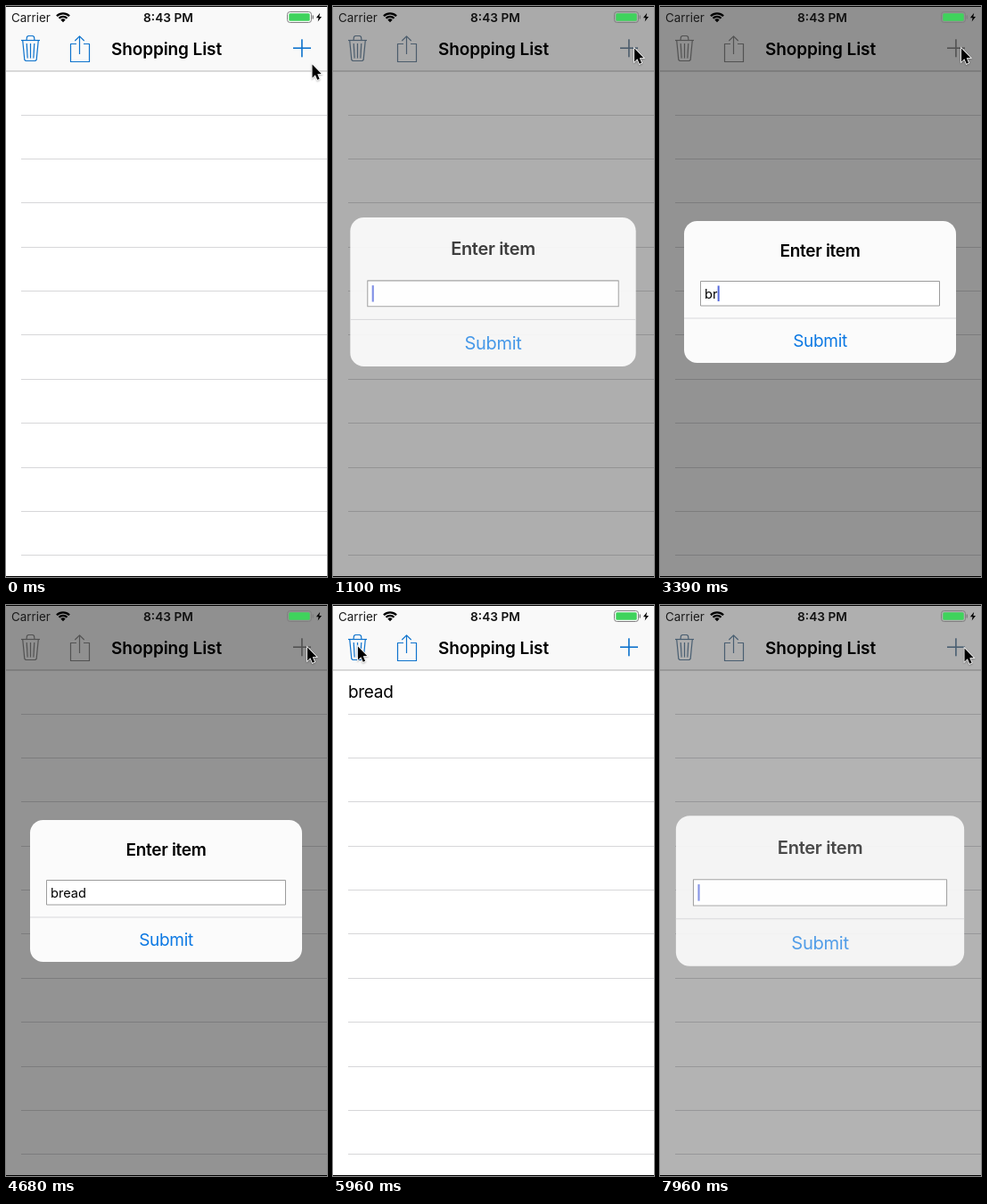
Animation of 360x640 px, one loop 7990 ms. Source, as an HTML page with a canvas:

```html
<!DOCTYPE html>
<html lang="en">
<head>
<meta charset="utf-8">
<title>Shopping List</title>
<style>
  html, body { margin: 0; width: 100%; height: 100%; overflow: hidden; background: #fff; }
  canvas { display: block; width: 100vw; height: 100vh; }
</style>
</head>
<body>
<canvas id="stage"></canvas>
<script>
const W = 360, H = 640, LOOP = 7990;
const FONT = 'Inter, Roboto, sans-serif';
const ROW = 49.4, FIRST_LINE = 122;
const ITEM = 'bread';
const KEY_TIMES = [3080, 3340, 3510, 3670, 3840];
const OPEN = [970, 7842];
const CLOSE = 4715, CLOSE_MS = 400;
const INSERT = 5205, INSERT_MS = 300, CLEAR = 6200;
// Pointer stops: time, x, y
const POINTER = [
  [0, 343.5, 65.5], [150, 343.5, 65.5], [700, 338, 47.5], [5140, 338, 47.5],
  [5900, 28, 46.5], [6450, 28, 46.5], [7150, 341.5, 48.5], [LOOP, 341.5, 48.5]
];

const canvas = document.getElementById('stage');
const ctx = canvas.getContext('2d');
const dpr = window.devicePixelRatio || 1;
canvas.width = W * dpr;
canvas.height = H * dpr;

const clamp = v => Math.max(0, Math.min(1, v));
const lerp = (a, b, p) => a + (b - a) * p;
const smooth = p => p * p * (3 - 2 * p);
const easeInOut = p => p < 0.5 ? 2 * p * p : 1 - 2 * (1 - p) * (1 - p);
const mix = (a, b, p) => `rgb(${a.map((v, i) => Math.round(lerp(v, b[i], p))).join(',')})`;

function spring(ms) {
  if (ms <= 0) return 0;
  const x = ms * 0.0205;
  return 1 - (1 + x) * Math.exp(-x);
}

function text(str, x, y, size, { weight = 400, color = '#000', align = 'left', spacing = 0 } = {}) {
  ctx.font = `${weight} ${size}px ${FONT}`;
  ctx.letterSpacing = spacing + 'px';
  ctx.textAlign = align;
  ctx.fillStyle = color;
  ctx.fillText(str, x, y);
}

function rect(x, y, w, h, color) {
  ctx.fillStyle = color;
  ctx.fillRect(x, y, w, h);
}

function polyline(...points) {
  ctx.beginPath();
  points.forEach(([x, y], i) => i ? ctx.lineTo(x, y) : ctx.moveTo(x, y));
}

function strokeLine(...points) {
  polyline(...points);
  ctx.stroke();
}

function withAlpha(alpha, draw) {
  ctx.save();
  ctx.globalAlpha *= alpha;
  draw();
  ctx.restore();
}

function drawRows(t) {
  const p = easeInOut(clamp((t - INSERT) / INSERT_MS));
  const inserted = t >= INSERT && t < CLEAR;
  const shift = inserted ? p * ROW : 0;
  const line = y => rect(17, Math.floor(y), W - 17, 1, '#d7d7d9');
  for (let y = FIRST_LINE + shift; y < H - 1; y += ROW) line(y);
  if (inserted) withAlpha(p, () => {
    line(FIRST_LINE);
    text(ITEM, 17, 104, 19, { spacing: -0.3 });
  });
}

function drawNav(dim) {
  rect(0, 0, W, 73, '#f9f9f9');
  rect(0, 72.5, W, 1, '#b5b5b5');
  text('Shopping List', 180, 55, 19, { weight: 600, align: 'center', spacing: -0.1 });

  const tint = mix([14, 115, 205], [142, 142, 142], dim);
  ctx.strokeStyle = tint;
  ctx.lineWidth = 1.2;
  ctx.lineJoin = 'round';

  // trash
  strokeLine([17, 38.5], [38, 38.5]);
  strokeLine([23, 38.5], [23.5, 34.5], [25, 33.5], [30, 33.5], [31.5, 34.5], [32, 38.5]);
  strokeLine([18.7, 38.5], [20.8, 60.3], [22.2, 61.5], [32.8, 61.5], [34.2, 60.3], [36.3, 38.5]);
  for (const d of [-1, 0, 1]) strokeLine([27.5 + d * 4.3, 42], [27.5 + d * 3.3, 58.5]);

  // share
  strokeLine([79, 42.5], [72.5, 42.5], [72.5, 62.5], [93.5, 62.5], [93.5, 42.5], [87, 42.5]);
  strokeLine([82.5, 34], [82.5, 54]);
  strokeLine([77.3, 39], [82.5, 33.8], [87.7, 39]);

  // add
  rect(322, 46.4, 20, 1.6, tint);
  rect(331.1, 37.3, 1.6, 20, tint);
}

function drawStatus() {
  text('Carrier', 6, 17.5, 13.4, { color: '#1a1a1a' });
  text('8:43 PM', 182, 17.5, 13.7, { weight: 600, color: '#111', align: 'center' });

  // wi-fi
  const a = Math.PI * 1.25, b = Math.PI * 1.75;
  ctx.strokeStyle = ctx.fillStyle = '#000';
  ctx.lineWidth = 2.3;
  for (const r of [10, 6.4]) {
    ctx.beginPath();
    ctx.arc(64, 18.3, r, a, b);
    ctx.stroke();
  }
  ctx.beginPath();
  ctx.moveTo(64, 18.3);
  ctx.arc(64, 18.3, 3.8, a, b);
  ctx.fill();

  // battery
  ctx.strokeStyle = '#808080';
  ctx.lineWidth = 1;
  ctx.beginPath();
  ctx.roundRect(315.5, 6.5, 27, 12, 3);
  ctx.stroke();
  rect(343.6, 10.5, 1.4, 4, '#808080');
  ctx.fillStyle = '#3fd35c';
  ctx.beginPath();
  ctx.roundRect(317.3, 8.3, 23.4, 8.4, 1.5);
  ctx.fill();
  ctx.fillStyle = '#000';
  polyline([352.2, 7.8], [347.9, 13.2], [350.6, 13.2], [349.7, 17.6], [354, 12], [351.3, 12]);
  ctx.fill();
}

// Visible strength of the dialog, its scale and the time it was opened
function dialogState(t) {
  const start = t >= OPEN[1] ? OPEN[1] : OPEN[0];
  const p = spring(t - start);
  const closing = t >= CLOSE && t < OPEN[1];
  return {
    start,
    scale: closing ? 1 : 1.2 - 0.2 * p,
    show: closing ? 1 - easeInOut(clamp((t - CLOSE) / CLOSE_MS)) : p
  };
}

function caretAlpha(ms) {
  const phase = ms % 1000;
  if (phase < 500) return 1;
  if (phase < 600) return (600 - phase) / 100;
  return phase < 900 ? 0 : (phase - 900) / 100;
}

function drawDialog(t, { start, scale, show }) {
  const typed = start === OPEN[0] ? KEY_TIMES.filter(k => t >= k).length : 0;
  const lastKey = typed ? KEY_TIMES[typed - 1] : start;
  const cx = 179.5, cy = 320.5;

  ctx.save();
  ctx.translate(cx, cy);
  ctx.scale(scale, scale);
  ctx.translate(-cx, -cy);

  withAlpha(1 - (1 - show) ** 2, () => {
    ctx.fillStyle = '#fbfbfb';
    ctx.beginPath();
    ctx.roundRect(27, 241, 305, 159, 14.6);
    ctx.fill();
    rect(27, 349.5, 305, 1, '#d9d9db');
    rect(45, 308, 269, 28.5, '#fff');
    ctx.strokeStyle = '#9c9c9c';
    ctx.lineWidth = 1;
    ctx.strokeRect(45.5, 308.5, 268, 27.5);
  });

  withAlpha(show, () => {
    text('Enter item', 179.5, 281, 19, { weight: 600, align: 'center', spacing: -0.3 });
    text('Submit', 179.5, 382, 19, { color: '#0b78e3', align: 'center', spacing: -0.3 });
    const value = ITEM.slice(0, typed);
    text(value, 50, 327.5, 14.6);
    const x = 50.2 + ctx.measureText(value).width;
    withAlpha(caretAlpha(t - lastKey), () => rect(x, 313.5, 2, 17.5, '#5468dc'));
  });
  ctx.restore();
}

function drawPointer(t) {
  const i = POINTER.findIndex((k, n) => n && t <= k[0]);
  const [t0, x0, y0] = POINTER[i - 1], [t1, x1, y1] = POINTER[i];
  const p = smooth((t - t0) / (t1 - t0));
  ctx.save();
  ctx.translate(lerp(x0, x1, p), lerp(y0, y1, p));
  ctx.scale(0.9, 0.93);
  polyline([0, 0], [0, 16], [3.7, 12.6], [6.4, 18.6], [9, 17.4], [6.4, 11.6], [11.3, 11.4]);
  ctx.closePath();
  ctx.lineJoin = 'miter';
  ctx.lineWidth = 1.8;
  ctx.strokeStyle = '#fff';
  ctx.shadowColor = 'rgba(0,0,0,0.3)';
  ctx.shadowBlur = 2 * dpr;
  ctx.shadowOffsetY = dpr;
  ctx.stroke();
  ctx.shadowColor = 'transparent';
  ctx.fillStyle = '#000';
  ctx.fill();
  ctx.restore();
}

function frame() {
  const t = performance.now() % LOOP;
  const dialog = dialogState(t);
  ctx.setTransform(dpr, 0, 0, dpr, 0, 0);
  rect(0, 0, W, H, '#fff');
  drawRows(t);
  drawNav(dialog.show);
  rect(0, 0, W, H, `rgba(0,0,0,${0.425 * dialog.show})`);
  drawStatus();
  if (dialog.show > 0) drawDialog(t, dialog);
  drawPointer(t);
  rect(0, 0, W, 1, '#000');
  rect(0, H - 1, W, 1, '#000');
  requestAnimationFrame(frame);
}
frame();
</script>
</body>
</html>
```
